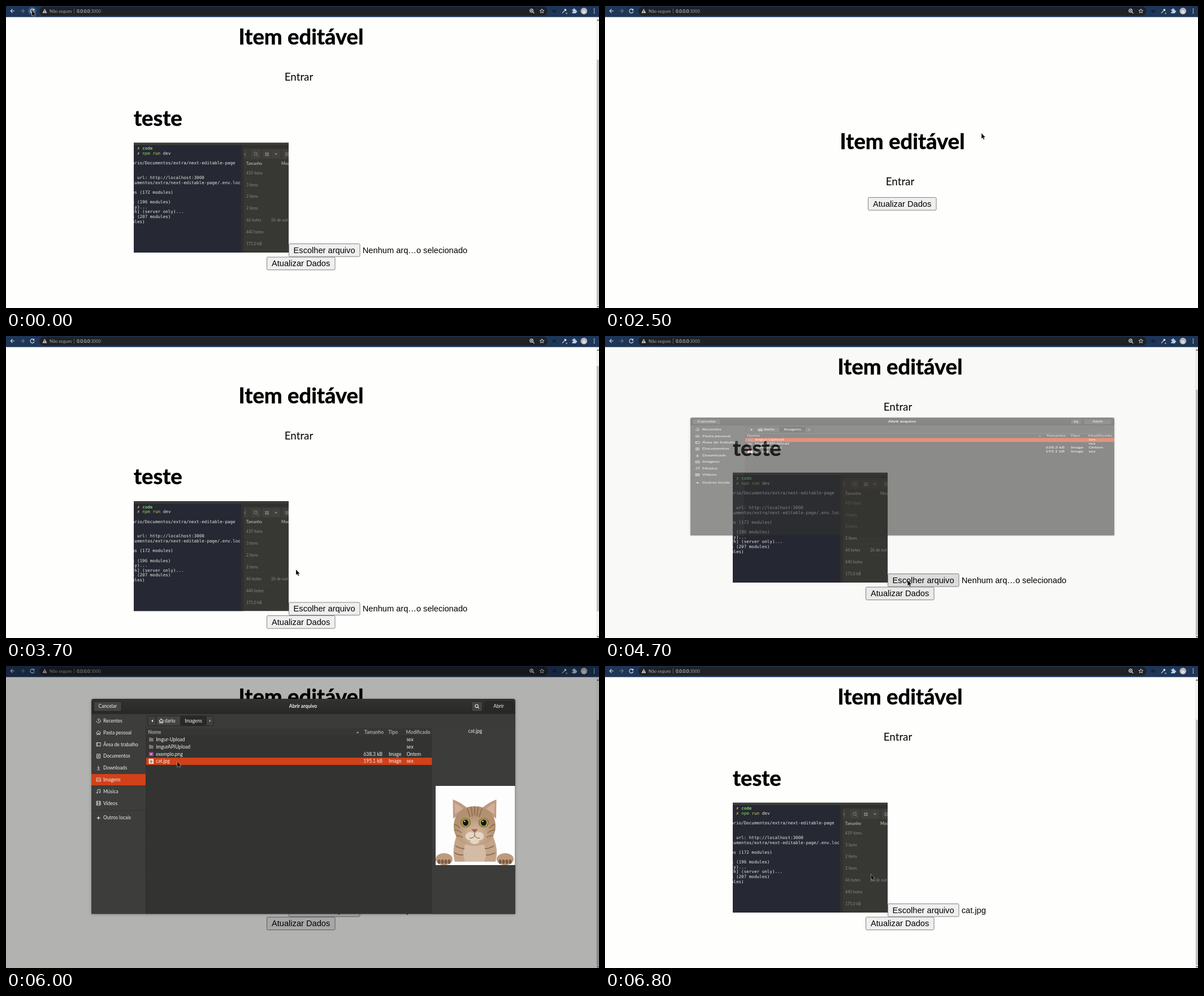
Recreate the animation shown at these times as an HTML page. Size 1049x534 px, loop 8 s.

```html
<!DOCTYPE html>
<html lang="pt">
<head>
<meta charset="utf-8">
<title>Item editável</title>
<style>
html, body { margin: 0; width: 100%; height: 100%; overflow: hidden; background: #fefefc; }
svg { display: block; width: 1049px; height: 534px; }
text { white-space: pre; }
.ui { font-family: Lato, "Open Sans", sans-serif; font-size: 8.5px; fill: #f0f0ee; }
.page { font-family: Lato, "Open Sans", sans-serif; fill: #000; }
.big { font-size: 38.2px; font-weight: 700; stroke: #000; stroke-width: .6; }
.form { font-family: "Liberation Sans", Arial, sans-serif; font-size: 14.64px; fill: #000; }
.term { font-family: "DejaVu Sans Mono", monospace; font-size: 7.6px; fill: #e9e9e4; }
.b { font-weight: 700; }
.line { fill: none; stroke: #dfe3ea; stroke-width: 1.1; }
</style>
</head>
<body>
<svg id="stage" viewBox="0 0 1049 534"></svg>
<script>
const LOOP = 8000, STEP = 100, MAX_SCROLL = 84;

const rect = (x, y, w, h, fill, more = '') =>
  `<rect x="${x}" y="${y}" width="${w}" height="${h}" fill="${fill}" ${more}/>`;
const text = (x, y, s, cls, more = '') => `<text x="${x}" y="${y}" class="${cls}" ${more}>${s}</text>`;
const path = (d, more = 'class="line"') => `<path d="${d}" ${more}/>`;
const circle = (x, y, r, more = 'class="line"') => `<circle cx="${x}" cy="${y}" r="${r}" ${more}/>`;
const ellipse = (x, y, rx, ry, fill) => `<ellipse cx="${x}" cy="${y}" rx="${rx}" ry="${ry}" fill="${fill}"/>`;
const group = (id, body, more = '') => `<g id="${id}" ${more}>${body}</g>`;
const fill = c => `fill="${c}"`;
const mid = 'text-anchor="middle"';

function button(id, x, y, w, label, tx) {
  return rect(x + .5, y + .5, w - 1, 22.6, '#efefef', `id="${id}" rx="1.8" stroke="#767676" stroke-width=".9"`) +
    text(tx, y + 16.6, label, 'form');
}

function toolbar() {
  const star = Array.from({ length: 10 }, (_, i) => {
    const a = i * Math.PI / 5 - Math.PI / 2, r = i % 2 ? 1.8 : 4;
    return `${948 + r * Math.cos(a)} ${9 + r * Math.sin(a)}`;
  }).join('L');
  return rect(0, 0, 1049, 19.6, '#1e3658') +
    rect(59, 1.2, 899, 15.8, '#202226', 'rx="7.9"') +
    path('M15 8.8H8.5M11.5 5.5 8.2 8.8l3.3 3.3') +
    path('M25.5 8.8H32M29 5.5l3.3 3.3-3.3 3.3', 'class="line" opacity=".4"') +
    circle(46.4, 8.8, 7.2, 'id="hover" fill="#fff" opacity=".17"') +
    path('M49 6.4A3.5 3.5 0 1 0 50 9.4') + path('M50.2 4.6V8h-3.4z', fill('#dfe3ea')) +
    path('M68.5 4.8l4 7.6h-8zM68.1 7.4v2.5h.9V7.4zM68.1 10.6v.9h.9v-.9z', 'fill="#c6c8cb" fill-rule="evenodd"') +
    text(77, 11.6, 'Não seguro', 'ui', 'style="font-size:7.9px;fill:#a3a6aa"') +
    rect(120, 4.3, .8, 9.2, '#6b6e73') +
    text(125.3, 11.6, '0.0.0.0<tspan fill="#9a9da1">:3000</tspan>', 'ui', 'style="font-size:7.6px"') +
    circle(929.6, 8.2, 2.8) + path('M931.8 10.4l2.6 2.6M928.3 8.2h2.6M929.6 6.9v2.6') +
    path(`M${star}Z`, 'class="line" style="stroke-width:.9"') +
    rect(966.5, 6.6, 7, 4.6, '#122744') +
    path('M984 12.6l4.6-4.8', 'class="line" stroke-width="1.6"') +
    path('M987.2 6.6l2.6 2.6 1.9-2.2-2.3-2.3z', fill('#e8eaee')) + rect(990.3, 11.6, 2.6, 2.6, '#c98b3c') +
    path('M1001.5 6.2h2.2a1.4 1.4 0 1 1 2.6 0h2v2.2a1.4 1.4 0 1 1 0 2.6v2h-6.8v-2.4a1.2 1.2 0 1 0 0-2.2z', fill('#b9cdea')) +
    circle(1022.4, 8.8, 5.9, fill('#b9b5b6')) + circle(1022.4, 10.4, 3.2, fill('#dedbdc')) +
    [5.4, 8.8, 12.2].map(y => circle(1040.5, y, .95, fill('#e4e7ec'))).join('');
}

// uploaded screenshot shown inside the page
function shot() {
  const row = n => 254.2 + 8.62 * n;
  const lines = [
    [3, 'ario/Documentos/extra/next-editable-page'], [6, '  url: http://localhost:3000'],
    [7, 'cumentos/extra/next-editable-page/.env.loc'], [9, 'ns (172 modules)'], [11, 's (196 modules)'],
    [12, 'ly)...'], [13, 'ch] (server only)...'], [14, 's (207 modules)'], [15, 'ules)']
  ];
  const sizes = ['419 itens', '3 itens', '2 itens', '2 itens', '46 bytes', '440 bytes', '175,0 kB'];
  const small = c => `style="font-size:7px;fill:${c}"`;
  return `<g clip-path="url(#shotClip)">` +
    rect(226, 241.5, 274, 194.5, '#373733') + rect(226, 241.5, 274, 4.6, '#3a3b38') +
    rect(226, 246, 190, 190, '#262833') + rect(416, 246, 4.6, 190, '#30302f') +
    rect(420.6, 246, 80, 6, '#31312e') + rect(420.6, 252, 80, 19, '#3b3a36') +
    [[421, 4], [434, 16], [454, 15], [470, 15], [490, 14]].map(([x, w]) => rect(x, 254, w, 15.5, '#42413d', 'rx="1.5"')).join('') +
    path('M423.5 260l-1.8 2 1.8 2M444 264.2l1.8 1.8', 'class="line" style="stroke:#8f8d88;stroke-width:.9"') +
    circle(441.8, 261.4, 2.7, 'fill="none" stroke="#8f8d88" stroke-width=".9"') +
    [458.6, 462].map(x => [259.2, 262.6].map(y => rect(x, y, 2.5, 2.5, '#8f8d88')).join('')).join('') +
    path('M475 260.8h5l-2.5 2.8z', fill('#8f8d88')) +
    [259.4, 261.6, 263.8].map(y => rect(494, y, 6, .9, '#8f8d88')).join('') +
    text(424.8, 280.9, 'Tamanho', 'ui b', small('#a9a7a1')) + text(487, 280.9, 'Mod', 'ui b', small('#a9a7a1')) +
    sizes.map((s, i) => rect(420.6, 305 + 20.9 * i, 80, .5, '#3d3c39') +
      text(425, 297.6 + 20.9 * i, s, 'ui', small('#8b8983'))).join('') +
    text(469, 381.2, '26 de out de', 'ui', small('#8b8983')) +
    text(232, row(0), '<tspan fill="#e5dc4e">✗</tspan> <tspan fill="#78c870">code</tspan>', 'term b') +
    text(232, row(1), '<tspan fill="#e5dc4e">✗</tspan> <tspan fill="#8fce5c">npm</tspan> <tspan fill="#c9d45c">run</tspan> dev', 'term') +
    lines.map(([n, s]) => text(222.8, row(n), s, 'term')).join('') + '</g>';
}

function page() {
  return rect(0, 19, 1049, 515, '#fefefc') +
    group('head', text(522, 68, 'Item editável', 'page big', mid) +
      text(518, 132, 'Entrar', 'page', mid + ' font-size="18.8"')) +
    group('data', text(226, 211.6, 'teste', 'page big') + shot() +
      button('choose', 500, 420, 126.5, 'Escolher arquivo', 508.6) +
      text(630.8, 436.6, '', 'form', 'id="file"')) +
    group('update', button('send', 461, 443.5, 121.5, 'Atualizar Dados', 470)) +
    group('bar', rect(1044, 19.6, 5, 515, '#f1f1f0') + rect(1045, 25, 4, 434, '#c1c1c0', 'id="thumb"') +
      path('M1045 26l2.2-2.8 2.2 2.8z', fill('#55595c')) + path('M1045 530.8l2.2 2.8 2.2-2.8z', fill('#55595c')));
}

// cat photo reduced to flat shapes
function cat() {
  const fur = '#bd9b7e', dark = '#7d5d45', pale = '#e6d5c4';
  const both = f => f(-1) + f(1);
  const stripe = 'fill="none" stroke="#8d6a4f" stroke-width="1.6"';
  return rect(760, 212, 140.5, 140, '#fdfdfd') +
    path('M797 300Q788 325 794 346H866Q872 325 861 300Z', fill('#c3a488')) +
    path('M812 316Q806 334 812 346H846Q852 334 846 316Z', fill('#d3bba5')) +
    both(s => path(`M${829 + s * 38} 270L${829 + s * 38.5} 236Q${829 + s * 25} 241 ${829 + s * 13} 251Z`, fill(fur)) +
      path(`M${829 + s * 35} 262L${829 + s * 35.5} 242Q${829 + s * 27} 246 ${829 + s * 20} 253Z`, fill('#d3ae9b')) +
      path(`M${829 + s * 34} 318q${-s * 8} 5 ${-s * 16} 5M${829 + s * 36} 330q${-s * 8} 5 ${-s * 16} 4`, stripe)) +
    path('M829 248C852 248 866 262 866 284C866 304 850 318 829 318C808 318 792 304 792 284C792 262 806 248 829 248Z', 'fill="url(#face)"') +
    path('M816 252l5 15M823 249l2 17M829 248v16M835 249l-2 17M842 252l-5 15', stripe) +
    both(s => path(`M${829 + s * 36} 280q${-s * 6} 1 ${-s * 10} 7M${829 + s * 36} 290q${-s * 7} 0 ${-s * 13} 5M${829 + s * 33} 300q${-s * 7} 0 ${-s * 12} 3`, stripe) +
      ellipse(829 + s * 16, 277, 9, 8.6, dark) + ellipse(829 + s * 16, 277, 7.6, 7.4, '#a9a94a') +
      ellipse(829 + s * 16, 277, 5, 5.6, '#17150f') + ellipse(829 + s * 16 - 1.5, 274.6, 1.2, 1.2, '#fff') +
      ellipse(829 + s * 7, 301, 9.5, 7.5, pale)) +
    ellipse(829, 310, 8, 5, pale) +
    path('M823 288.5h12l-6 6.5z', fill('#a9604f')) +
    path('M829 295v5M829 300q-4 6-9 4M829 300q4 6 9 4', 'fill="none" stroke="#6f4d3c" stroke-width="1"') +
    both(s => ellipse(829 + s * 54, 341.5, 15, 10.5, fur) +
      [-9, -3, 3, 9].map(d => ellipse(829 + s * 54 + d, 346, 2.5, 4, dark)).join(''));
}

function dialog() {
  const edge = 'rx="2" stroke="#20201f" stroke-width=".8"';
  const cell = (x, w, c) => rect(x, 88.5, w, 17, c, edge);
  const places = ['Recentes', 'Pasta pessoal', 'Área de trabalho', 'Documentos', 'Downloads', 'Imagens', 'Música', 'Vídeos'];
  const icons = [
    'M-3.5 0a3.5 3.5 0 1 0 1.2-2.6M0-2V.4L1.6 1.4', 'M-4 .2L0-3.5 4 .2M-2.8-.5V3.5H-.8V1H.8V3.5H2.8V-.5',
    'M-3.6-3H3.6V3H-3.6zM-1.8-3V3', 'M-3-3.6H3V3.6H-3zM-1.5-1.4H1.6M-1.5.2H1.6M-1.5 1.8H.4',
    'M0-3.8V1.4M-2-.6L0 1.4 2-.6M-2.4 3.4H2.4', 'M-3.6-3H3.6V3H-3.6zM-2.8 2L-.8-.6.8 1 1.6.2 3 2',
    'M-1.6 2.4V-3L3-3.6V1.6M-3.2 2.4a.8.8 0 1 0 1.6 0a.8.8 0 1 0-1.6 0M1.4 1.6a.8.8 0 1 0 1.6 0a.8.8 0 1 0-1.6 0',
    'M-3.6-3.4H3.6V3.4H-3.6zM-2-3.4V3.4M2-3.4V3.4M-2 0H2'
  ];
  const files = [['Imgur-Upload', '', '', 'sex'], ['imgurAPIUpload', '', '', 'sex'],
    ['exemplo.png', '638.3 kB', 'Image', 'Ontem'], ['cat.jpg', '195.1 kB', 'Image', 'sex']];
  const rowY = i => 133.3 + 12.65 * i;
  const head = 'style="fill:#a8a7a3"';
  const end = 'text-anchor="end"';

  const top = path('M151 84.5V62q0-4 4-4H897q4 0 4 4V84.5z', 'fill="url(#headFill)"') +
    rect(155.3, 63, 49, 17, '#434341', edge) + text(179.8, 74.3, 'Cancelar', 'ui', mid) +
    text(525.5, 74.3, 'Abrir arquivo', 'ui b', mid) +
    rect(824, 63, 18.5, 17, '#434341', edge) + circle(832.6, 70.7, 2.7) + path('M834.6 72.8l2.3 2.3') +
    rect(847.3, 63, 49.2, 17, '#434341', 'id="open" ' + edge) + text(871.6, 74.3, 'Abrir', 'ui', mid);

  const side = rect(151, 84.5, 96.5, 354, '#3d3d3b') +
    rect(151, 191, 96, 20, '#d24119', 'id="place"') +
    places.map((s, i) => `<g transform="translate(163.6 ${97 + 20.8 * i})">` + path(icons[i], 'class="line" style="stroke-width:.9"') +
      text(8.4, 2.9, s, 'ui') + '</g>').join('') +
    rect(151, 255, 96, .7, '#32322f') + path('M160.8 268.6h5.6M163.6 265.8v5.6') + text(172, 271.4, 'Outros locais', 'ui');

  const crumbs = rect(247.5, 84.5, 653.5, 25.5, '#3b3b39') +
    cell(251, 15, '#40403e') + cell(266, 43, '#434341') + cell(309, 45, '#292928') + cell(354, 13, '#40403e') +
    path('M260 94.6v5l-2.8-2.5z', fill('#eee')) + path('M359.6 94.6v5l2.8-2.5z', fill('#a5a5a2')) +
    path('M270.6 97.4l4-3.8 4 3.8M271.8 96.5v4.3h2v-2.6h1.7v2.6h2v-4.3') +
    text(280.6, 100, 'dario', 'ui') + text(316.2, 100, 'Imagens', 'ui');

  const list = rect(247.5, 110, 653.5, 328.5, '#333331') + rect(247.5, 110, 653.5, 13.6, '#363634') +
    rect(247.5, 123.5, 653.5, .6, '#2b2b29') +
    group('pane', rect(753.5, 110, 147.5, 328.5, '#3c3c3a')) +
    rect(248, 124, 653, 12.8, '#d24119', 'id="picked"') +
    text(251.3, 119.9, 'Nome', 'ui b', head) +
    files.map((f, i) => text(265.2, rowY(i), f[0], 'ui')).join('') +
    [0, 1].map(i => path(`M253 ${126.6 + 12.65 * i}h3l1 1h3.6v6H253z`, fill('#7c7571'))).join('') +
    rect(252.8, 152.3, 8, 7, '#a8428f', 'rx=".8"') + rect(255, 154.3, 3.6, 3, '#e2a0d3') +
    rect(252.6, 164.2, 8.4, 8.6, '#f4efe8') + circle(256.8, 169, 2.5, fill('#b08f73')) +
    group('cols', path('M619.6 118.4h5l-2.5-2.6z', fill('#a8a7a3')) +
      text(633.8, 119.9, 'Tamanho', 'ui b', head) + text(676.3, 119.9, 'Tipo', 'ui b', head) + text(707.6, 119.9, 'Modificado', 'ui b', head) +
      files.map((f, i) => text(666, rowY(i), f[1], 'ui', end) + text(677, rowY(i), f[2], 'ui') +
        text(708.4, rowY(i), f[3], 'ui')).join('')) +
    group('preview', text(830, 118, 'cat.jpg', 'ui', mid) + cat());

  return rect(151, 59, 750, 380, '#000', 'rx="4" opacity=".25" filter="url(#blur)"') +
    top + side + crumbs + list + rect(247, 84.5, .7, 354, '#292927') + rect(151, 84.2, 750, .7, '#1f1f1e');
}

document.getElementById('stage').innerHTML =
  '<defs><clipPath id="shotClip"><rect x="226" y="241.5" width="274" height="194.5"/></clipPath>' +
  '<linearGradient id="headFill" x2="0" y2="1"><stop stop-color="#323230"/><stop offset="1" stop-color="#282827"/></linearGradient>' +
  '<radialGradient id="face" cy=".7"><stop stop-color="#d6bda6"/><stop offset="1" stop-color="#b3906f"/></radialGradient>' +
  '<filter id="blur" x="-5%" y="-5%" width="110%" height="110%"><feGaussianBlur stdDeviation="2.5"/></filter></defs>' +
  page() + toolbar() + rect(0, 0, 1049, 534, '#000', 'id="dim"') + group('dialog', dialog()) +
  group('arrow', path('M0 0V9.6L2.2 7.6 3.7 10.9 5.3 10.2 3.8 7H6.7Z', 'fill="#111" stroke="#fff" stroke-width=".8" paint-order="stroke"')) +
  group('beam', path('M-1.6-4H1.6M-1.6 4H1.6M0-4V4', 'fill="none" stroke="#333" stroke-width=".9"'));

const el = {};
document.querySelectorAll('[id]').forEach(n => el[n.id] = n);
const set = (id, name, v) => el[id].setAttribute(name, v);
const show = (id, on) => set(id, 'visibility', on ? 'visible' : 'hidden');
const move = (id, x, y) => set(id, 'transform', `translate(${x} ${y})`);
const clamp = x => Math.max(0, Math.min(1, x));
const smooth = x => (x = clamp(x)) * x * (3 - 2 * x);

// value of a keyed track at time t; keys are [time, ...values]
function track(keys, t, ease = smooth) {
  let i = 0;
  while (i < keys.length - 2 && t >= keys[i + 1][0]) i++;
  const [a, b] = [keys[i], keys[i + 1]], k = ease((t - a[0]) / (b[0] - a[0]));
  return a.slice(1).map((v, j) => v + (b[j + 1] - v) * k);
}

const POINTER = [[0, 46, 8], [550, 46, 8], [1000, 90, 43], [1800, 666, 216], [1900, 666, 216], [2500, 666, 225],
  [2650, 666, 225], [3250, 513, 413], [4250, 513, 413], [4550, 535.5, 432], [4850, 535.5, 432], [5450, 302.8, 168.8],
  [6320, 302.8, 168.8], [6800, 470.6, 368.4]];
const SCROLL = [[3250, 0], [3500, 29], [3640, 29], [3700, 33.5], [3850, 58], [4100, MAX_SCROLL]];

function draw(t) {
  const empty = t >= 400 && t < 2700;
  const scroll = t < 400 ? MAX_SCROLL : track(SCROLL, t, clamp)[0];
  const dy = MAX_SCROLL - scroll;
  move('head', empty ? 4 : 0, empty ? 184.8 : dy);
  move('update', empty ? 4 : 0, empty ? -105.5 : dy);
  move('data', 0, dy);
  show('data', !empty);
  show('bar', !empty);
  set('thumb', 'y', 25 + scroll * 70 / MAX_SCROLL);
  set('choose', 'fill', t > 4450 && t < 5000 ? '#e0e0e0' : '#efefef');
  el.file.textContent = t >= 6200 ? 'cat.jpg' : 'Nenhum arq…o selecionado';
  show('hover', t < 700);

  set('dim', 'opacity', .3 * smooth((t - 4620) / 500) * (1 - smooth((t - 6180) / 255)));
  const grow = clamp((t - 4620) / 146) * (1 - clamp((t - 6150) / 110));
  show('dialog', grow > 0);
  set('dialog', 'opacity', grow);
  set('dialog', 'transform', `translate(0 ${248.7 * (1 - grow)}) scale(1 ${grow})`);
  const pane = t >= 5400;
  set('place', 'opacity', t >= 4790 ? 1 : 0);
  set('pane', 'opacity', pane ? 1 : 0);
  set('preview', 'opacity', t >= 5600 ? 1 : 0);
  set('picked', 'y', pane ? 162.1 : 124);
  set('picked', 'width', pane ? 505.5 : 653);
  move('cols', pane ? 0 : 147, 0);
  set('open', 'fill', t >= 6000 ? '#292928' : '#434341');

  const [x, y] = track(POINTER, t), beam = t >= 6230 && t < 6500;
  move('arrow', x, y);
  move('beam', x + 2.2, y + 2.4);
  show('arrow', !beam);
  show('beam', beam);
}

function tick() {
  const t = performance.now() % LOOP;
  draw(Math.floor((t + 5) / STEP) * STEP % LOOP);
  requestAnimationFrame(tick);
}
tick();
</script>
</body>
</html>
```
